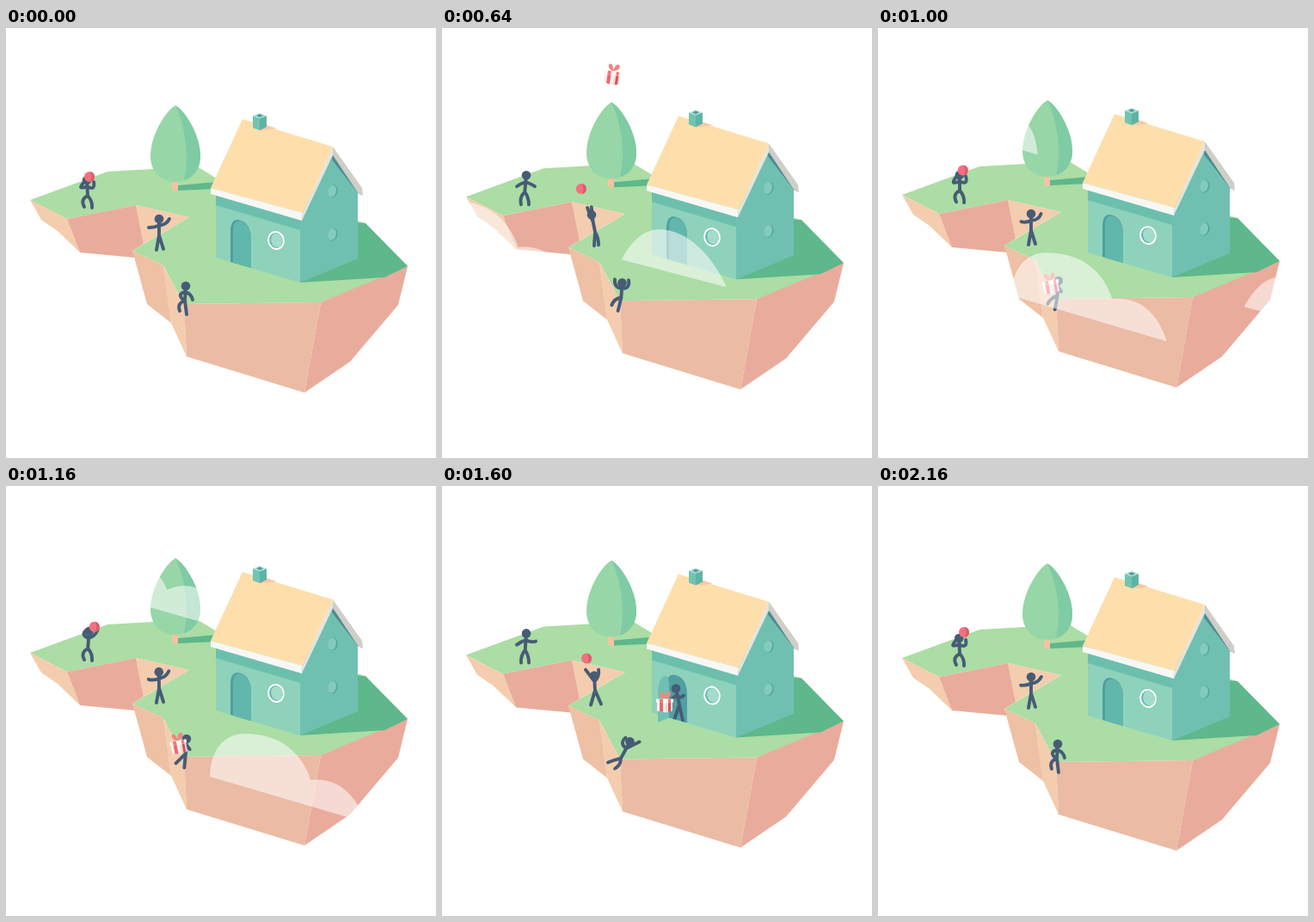
Write an HTML page that moves like this. It is 500 px wide and 500 px high and loops after 2.2 s.

```html
<!DOCTYPE html>
<html lang="en">
<head>
<meta charset="utf-8">
<title>Floating island</title>
<style>
  html, body { margin: 0; width: 100%; height: 100%; overflow: hidden; background: #fff; }
  svg { display: block; width: 100vw; height: 100vh; }
  .cloud { fill: #fff; opacity: .55; }
  .limbs { fill: none; stroke: #465c75; stroke-width: 3.9; stroke-linecap: round; stroke-linejoin: round; }
  .head { fill: #465c75; }
</style>
</head>
<body>
<svg viewBox="0 0 500 500">
  <defs>
    <clipPath id="doorway"><path d="M261 272V237Q261 222 270 223Q285 226 285 246V279Z"/></clipPath>
    <g id="box">
      <path fill="#f4857f" d="M0-7C-8-9-7-17-3-15Q0-13 0-7C1-14 4-18 7-14Q8-9 0-7Z"/>
      <path fill="#fdf1ea" d="M-9-4H1.5V9L-9 7Z"/>
      <path fill="#f1dcd4" d="M1.5-4H9V7L1.5 9Z"/>
      <path fill="#ea6672" d="M-6-4H-2V8.3L-6 7.6Z"/>
      <path fill="#d5535f" d="M4-4H7V7.6L4 8.3Z"/>
      <path fill="#fff8f3" d="M-10-7H10V-3L1.5-2-10-3Z"/>
      <path fill="#f4757c" d="M-6-7H-2V-2.4L-6-2.8ZM4-7H7V-2.7L4-2.4Z"/>
    </g>
  </defs>

  <g id="isle">
    <!-- ground -->
    <path fill="#abdda4" d="M28 200L118 167 222 161 250 178 418 227 467 277 440 290 366 319 207 321 183 276 147 259 213 220 151 206 71 222Z"/>
    <path fill="#f3cdae" d="M28 200L71 222 86 261 60 236 41 223ZM151 206L213 220 160 251ZM183 276L207 321 210 382 192 343Z"/>
    <path fill="#e9ac9c" d="M71 222L151 206 160 251 147 259 150 267 86 261ZM366 319L467 277 456 322 400 388 347 424Z"/>
    <path fill="#eec0a4" d="M147 259L183 276 192 343 164 321Z"/>
    <path fill="#ebbba4" d="M207 321L366 319 347 424 210 382Z"/>
    <path fill="#5fb78c" d="M342 296L405 226 418 227 467 277 440 290ZM200 183L245 179V187L200 189Z"/>

    <!-- tree -->
    <path fill="#f2c3a2" d="M193 176H200V189L196 190 193 188Z"/>
    <path fill="#97d6a6" d="M197 90C186 96 168 124 168 149C168 168 181 179 197 179C214 179 226 167 226 149C226 124 208 96 197 90Z"/>
    <path fill="#7fcba3" d="M197 90C208 112 214 150 207 177C219 173 226 163 226 149C226 124 208 96 197 90Z"/>
    <path id="cloudC" class="cloud" d="M0 0C2-24 12-39 26-39C48-39 64-22 70-6C92-16 122-14 126 36Z"/>

    <!-- house -->
    <path fill="#8ed2bb" d="M244 188L342 218V296L244 267Z"/>
    <path fill="#6dbfad" d="M244 190L342 220V235L244 206Z"/>
    <path fill="#70c0b1" d="M342 218L380 144 409 184V268L342 296Z"/>
    <path fill="#4f8a90" d="M380 146L410 186V193L379 153Z"/>
    <path fill="#fedfab" d="M275 106L380 138 345 215 238 186Z"/>
    <path fill="#f7f8f6" d="M238 186L345 215 344 224 238 193Z"/>
    <path fill="#e6e4dc" d="M345 215L380 138V148L344 224Z"/>
    <path fill="#cfcec7" d="M380 138L414 186 415 195 410 193 380 148Z"/>
    <path fill="#f9c9a5" d="M295 119L303 113 315 117 301 119Z"/>
    <path fill="#72c4b2" d="M287 102L295 105V119L287 116Z"/>
    <path fill="#5eb3a6" d="M295 105L303 102V115L295 119Z"/>
    <path fill="#b5e2d4" d="M287 102L295 99 303 102 295 105Z"/>
    <path fill="#4f9fa3" d="M291 102L295 100 299 102 295 104Z"/>
    <g transform="rotate(-14 314 247)">
      <ellipse cx="314" cy="247" rx="8.8" ry="10" fill="#62b7ac" stroke="#fff" stroke-width="2"/>
      <ellipse cx="315" cy="247" rx="6.8" ry="8.4" fill="#a3dccb"/>
    </g>
    <g id="pane">
      <g transform="rotate(14 380 190)">
        <ellipse cx="380" cy="190" rx="5.6" ry="7.5" fill="#56a6a2"/>
        <ellipse cx="379" cy="190" rx="4.8" ry="7" fill="#84cbbd"/>
      </g>
    </g>
    <use href="#pane" y="50"/>

    <!-- doorway -->
    <g clip-path="url(#doorway)">
      <path fill="#4f9fa3" d="M258 218H288V282H258Z"/>
      <g id="host"></g>
      <use id="giftIn" href="#box"/>
    </g>
    <path id="door" d="M0 0V-36Q0-51 10-51Q21-49 21-34V0Z"/>

    <g id="thrower"></g>
    <g id="catcher"></g>
    <g id="ball">
      <circle r="6" fill="#f4707f"/>
      <path fill="#de5a6b" d="M1-5.9A6 6 0 0 1 1 5.9Q4 0 1-5.9Z"/>
    </g>
    <g id="sitter"></g>
    <use id="giftOut" href="#box"/>
  </g>
  <path id="cloudA" class="cloud" d="M0 0C12-22 26-35 44-35C76-35 106-5 122 32Z"/>
  <path id="cloudB" class="cloud" d="M0 0C0-28 14-50 40-50C80-50 106-30 117 4C150 0 172 24 180 53Z"/>
</svg>

<script>
const LOOP = 2200, PLAY = 1100;
const $ = id => document.getElementById(id);
const clamp = u => Math.min(1, Math.max(0, u));
const mix = (a, b, u) => a + (b - a) * u;
const smooth = u => u * u * (3 - 2 * u);
const move = (x, y) => `translate(${x} ${y})`;
const place = (id, transform) => $(id).setAttribute('transform', transform);

// Keys are [time, ...values]; values ease from key to key and wrap around.
function track(keys, t, period = LOOP) {
  const n = keys.length;
  let i = n - 1;
  while (i >= 0 && keys[i][0] > t) i--;
  const a = keys[(i + n) % n], b = keys[(i + 1) % n];
  const start = i < 0 ? a[0] - period : a[0];
  const end = i === n - 1 ? b[0] + period : b[0];
  const u = smooth((t - start) / (end - start));
  return a.slice(1).map((v, k) => mix(v, b[k + 1], u));
}

// Ballistic arc between two keys [time, x, y].
function arc([ta, xa, ya], [tb, xb, yb], t, g) {
  const u = (t - ta) / (tb - ta);
  return [mix(xa, xb, u), mix(ya, yb, u) + g / 2 * (t - ta) * (t - tb)];
}

const thrower = {
  head: [[0, 94, 177], [100, 98, 174], [640, 98, 175], [960, 95, 177]],
  hip: [[0, 95, 195], [300, 97, 194]],
  left: [[0, 91, 179], [100, 97, 169], [260, 92, 171], [320, 91, 173], [500, 87, 188], [640, 87, 188], [960, 91, 179]],
  right: [[0, 102, 179], [100, 109, 170], [320, 107, 173], [500, 109, 184], [640, 108, 188], [960, 102, 178]],
  feet: [[0, 91, 208, 100, 209], [550, 92, 209, 101, 209]]
};

const catcher = {
  head: [[0, 178, 222], [300, 176, 223], [500, 177, 224], [600, 174, 221], [660, 174, 221], [900, 178, 222]],
  hip: [[0, 178, 241]],
  left: [[0, 166, 232], [260, 164, 223], [420, 167, 214], [500, 167, 217], [600, 169, 212], [660, 169, 213], [900, 167, 230]],
  right: [[0, 190, 222], [260, 185, 216], [420, 179, 214], [500, 182, 217], [600, 173, 212], [660, 174, 212], [900, 189, 222]],
  feet: [[0, 175, 258, 183, 257], [500, 173, 258, 185, 257], [620, 177, 257, 182, 256], [900, 175, 258, 183, 257]]
};

const sitter = {
  head: [[0, 209, 300], [1400, 210, 300], [1500, 217, 300], [1650, 219, 301], [1960, 209, 300]],
  hip: [[0, 208, 317], [1400, 209, 317], [1600, 208, 320], [1960, 208, 317]],
  left: [[0, 206, 316], [480, 204, 312], [640, 201, 296], [860, 201, 295], [960, 204, 309], [1400, 205, 310], [1500, 214, 295], [1700, 213, 297], [1960, 206, 316]],
  right: [[0, 217, 316], [480, 217, 315], [640, 217, 297], [860, 214, 295], [960, 208, 308], [1400, 208, 309], [1500, 229, 299], [1700, 230, 303], [1960, 217, 316]],
  feet: [[0, 202, 329, 210, 333], [320, 198, 326, 204, 332], [860, 197, 326, 205, 333], [1400, 198, 330, 209, 334], [1600, 193, 325, 201, 332], [1960, 201, 329, 209, 333]]
};

const host = {
  head: [[0, 272, 239]],
  hip: [[0, 276, 258]],
  left: [[1360, 262, 251], [1560, 264, 256]],
  right: [[0, 281, 247]],
  feet: [[0, 270, 275, 280, 276]]
};

// Two-segment limb, bent towards a hint direction.
function limb(a, b, size, hx, hy) {
  const dx = b[0] - a[0], dy = b[1] - a[1], d = Math.hypot(dx, dy) || 1;
  const px = -dy / d, py = dx / d;
  const bend = 2 * Math.sqrt(Math.max(0, size * size - d * d / 4)) * (px * hx + py * hy);
  return `M${a}Q${(a[0] + b[0]) / 2 + px * bend} ${(a[1] + b[1]) / 2 + py * bend} ${b}`;
}

function drawMan(id, man, t, period) {
  const at = part => track(man[part], t, period);
  const head = at('head'), hip = at('hip'), feet = at('feet');
  const neck = head.map((v, k) => mix(v, hip[k], .4));
  const [limbs, skull] = $(id).children;
  limbs.setAttribute('d', `M${head}L${neck}L${hip}`
    + limb(neck, at('left'), 7.5, -.93, .37)
    + limb(neck, at('right'), 7.5, .93, .37)
    + limb(hip, feet.slice(0, 2), 8, -.9, 0)
    + limb(hip, feet.slice(2), 8, .6, 0));
  skull.setAttribute('cx', head[0]);
  skull.setAttribute('cy', head[1]);
}

const ballOut = [[40, 98, 172], [260, 148, 173], [320, 158, 183], [410, 172, 207]];
const ballBack = [[580, 172, 207], [640, 162, 191], [960, 98, 172]];
const ballCaught = [[410, 172, 207], [500, 168, 204], [580, 172, 207]];
const ballHeld = [[0, 97, 173], [40, 98, 172], [960, 98, 172], [1060, 100, 170]];

function flight(points, t) {
  const i = points.findIndex(p => p[0] > t);
  return arc(points[i - 1], points[i], t, .00115);
}

function ballAt(t) {
  if (t < 40 || t >= 960) return track(ballHeld, t, PLAY);
  if (t < 410) return flight(ballOut, t);
  return t < 580 ? track(ballCaught, t, PLAY) : flight(ballBack, t);
}

function giftAt(t) {
  if (t < 640) return [198, 61];
  if (t < 930) {
    const u = (t - 640) / 290;
    return [mix(198, 201, u), mix(61, 306, u * u)];
  }
  if (t < 1430) return [201, mix(306, 311, smooth(clamp((t - 930) / 410)))];
  if (t < 1580) return arc([1430, 201, 311], [1580, 259, 258], t, .004);
  const u = smooth(clamp((t - 1680) / 220));
  return [mix(259, 294, u), mix(258, 266, u)];
}

const giftTilt = [[640, 8], [930, -10], [1430, -12], [1580, 0], [2000, 0]];
const doorSwing = [[1180, 0], [1360, 72], [1500, 91], [1700, 91], [1960, 0]];
const hostSlide = [[1200, 24], [1350, 0], [1700, 0], [1920, 24]];

function drawDoor(t) {
  const a = track(doorSwing, t)[0] * Math.PI / 180;
  const c = Math.cos(a), s = Math.sin(a);
  place('door', `matrix(${c - .6 * s} ${.29 * c + .25 * s} 0 1 264 273)`);
  $('door').setAttribute('fill', a > .6 ? '#70c0b1' : '#62b7ac');
}

function drawGift(t) {
  const inside = t > 1790;
  const size = smooth(clamp((t - 570) / 70));
  const pose = `${move(...giftAt(t))} rotate(${track(giftTilt, t)[0]}) scale(${size})`;
  place('giftIn', pose);
  place('giftOut', pose);
  $('giftIn').style.display = inside && t < 1960 ? '' : 'none';
  $('giftOut').style.display = inside || t < 575 ? 'none' : '';
}

function drift(id, dt, x, y, vx, vy) {
  place(id, move(x + vx * dt, y + vy * dt));
}

function draw(now) {
  const t = now % LOOP, beat = t % PLAY;
  place('isle', move(0, -3 * (1 - Math.cos(2 * Math.PI * t / LOOP))));
  drawMan('thrower', thrower, beat, PLAY);
  drawMan('catcher', catcher, beat, PLAY);
  drawMan('sitter', sitter, t, LOOP);
  drawMan('host', host, t, LOOP);
  const slide = track(hostSlide, t)[0];
  place('host', move(slide, slide / 4));
  place('ball', move(...ballAt(beat)));
  drawDoor(t);
  drawGift(t);
  drift('cloudA', t - 640, 208, 269, .603, .153);
  drift('cloudB', t - 1000, 155, 311, .511, .167);
  drift('cloudC', t - 1360, 189, 152, .36, .097);
  requestAnimationFrame(draw);
}

for (const id of ['thrower', 'catcher', 'sitter', 'host'])
  $(id).innerHTML = '<path class="limbs"/><circle class="head" r="5.3"/>';
requestAnimationFrame(draw);
</script>
</body>
</html>
```
